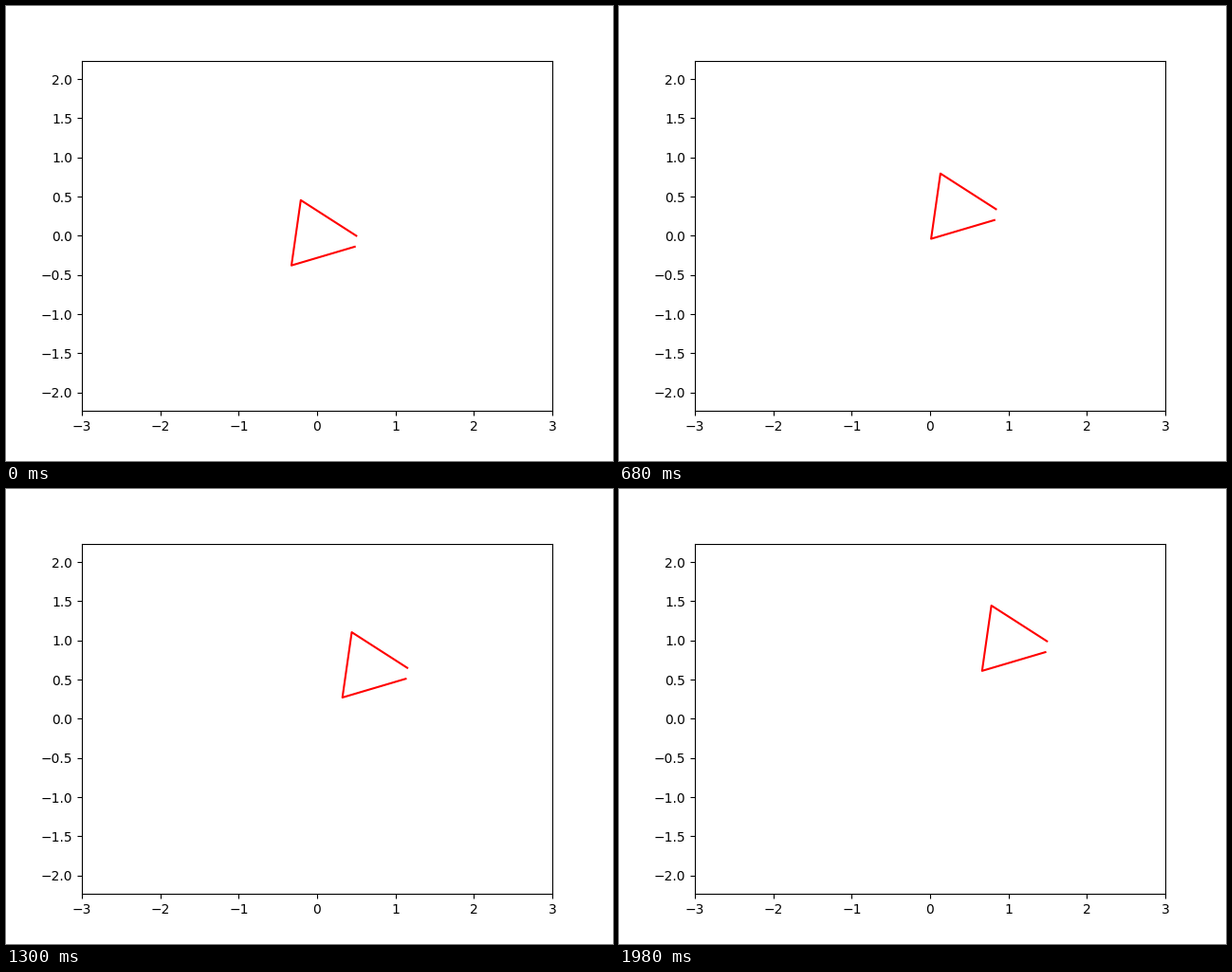
Animation, 640 px wide and 480 px high, one loop 2000 ms. Source, as a matplotlib script:

```python
import numpy as np
import matplotlib.pyplot as plt
from matplotlib.animation import FuncAnimation

FRAMES = 100
INTERVAL = 20  # ms
STEP = 0.01    # shift along both axes per frame
RADIUS = 0.5

fig, ax = plt.subplots(figsize=(6.4, 4.8), dpi=100)

# Equal scale on both axes
box = ax.get_window_extent()
half_width = 3
half_height = half_width * box.height / box.width
ax.set_xlim(-half_width, half_width)
ax.set_ylim(-half_height, half_height)

# A circle sampled so coarsely that it becomes an open triangle
theta = np.arange(0, 2 * np.pi, 2)
x = RADIUS * np.cos(theta)
y = RADIUS * np.sin(theta)
line, = ax.plot(x, y, color="red", lw=1.5, scalex=False, scaley=False)


def update(i):
    shift = STEP * i
    line.set_data(x + shift, y + shift)
    return line,


anim = FuncAnimation(fig, update, frames=FRAMES, interval=INTERVAL,
                     repeat=True, repeat_delay=0)
plt.show()
```
